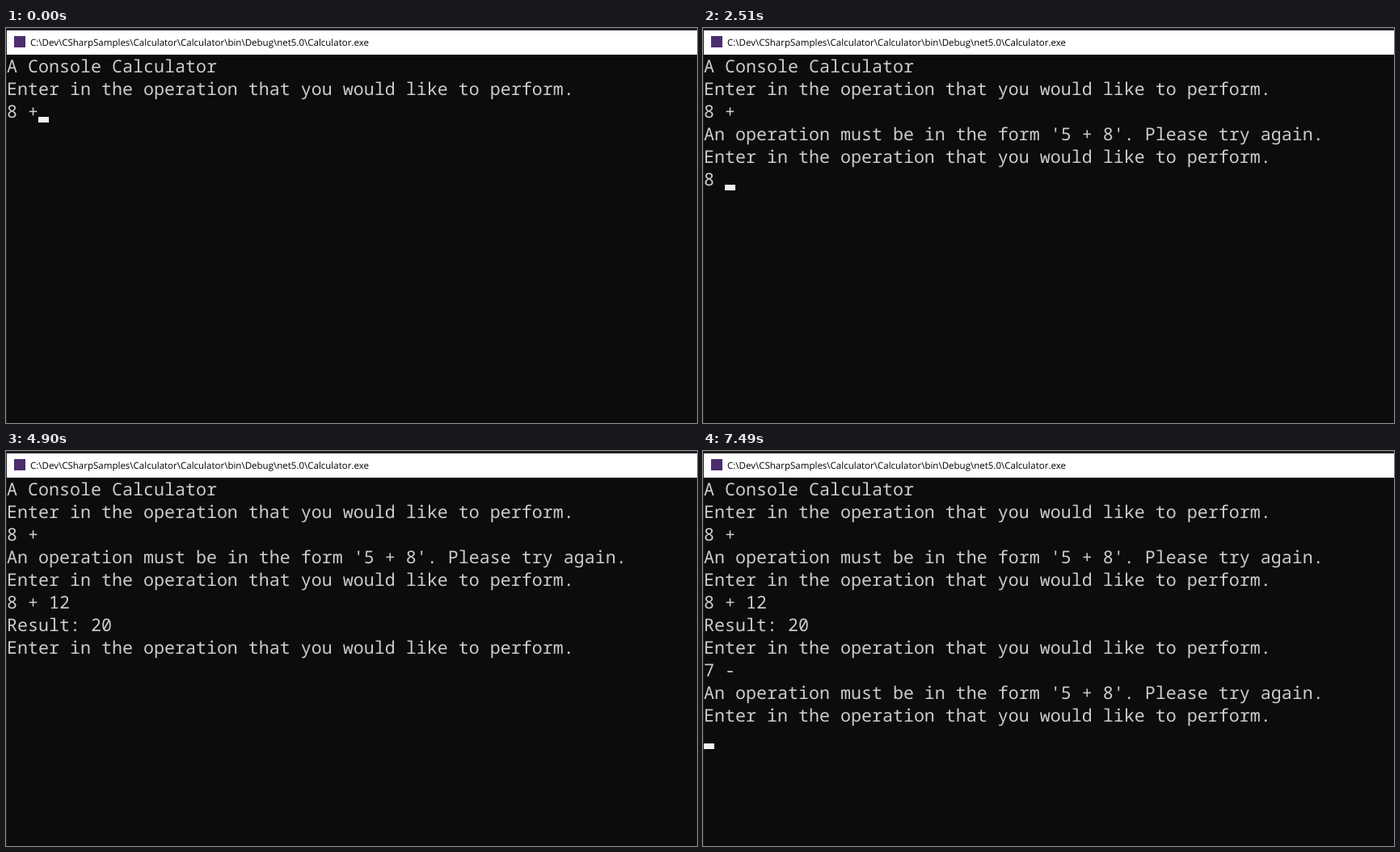
An HTML page for the animation above (8000 ms loop, 855 by 489 pixels).

```html
<!DOCTYPE html>
<html lang="en">
<head>
<meta charset="utf-8">
<title>Console calculator</title>
<style>
  html, body { margin: 0; height: 100%; overflow: hidden; background: #0c0c0c; }
  svg { display: block; text-rendering: geometricPrecision; }
  .title { font: 11.53px "Open Sans", sans-serif; fill: #000; }
  #lines { font: 21.667px "Noto Sans Mono", monospace; fill: #ccc; }
</style>
</head>
<body>
<svg width="855" height="489" viewBox="0 0 855 489">
  <rect width="855" height="489" fill="#211f22"/>
  <rect x="1" y="3" width="854" height="30" fill="#fff"/>
  <rect x="1" y="33" width="854" height="456" fill="#0c0c0c"/>
  <rect x="10" y="10" width="14" height="14" fill="#4b2d6e"/>
  <text class="title" x="30" y="22">C:\Dev\CSharpSamples\Calculator\Calculator\bin\Debug\net5.0\Calculator.exe</text>
  <g id="lines"></g>
  <rect id="cursor" width="13" height="7" fill="#f2f2f2"/>
</svg>
<script>
const DURATION = 8000, LEFT = 1, TOP = 33, CELL = 13, LINE = 28, BASELINE = 22, ROWS = 12;
const PROMPT = "Enter in the operation that you would like to perform.\n";
const ERROR = "\nAn operation must be in the form '5 + 8'. Please try again.\n" + PROMPT;

// [time in ms, text to append]; null hides the cursor until the next entry
const events = [
  [0, "A Console Calculator\n" + PROMPT + "8 +"], [130, null],
  [560, ERROR], [1270, null], [1800, ""],
  [2230, "8"], [2510, " "], [2760, null],
  [2910, "+"], [3160, " "], [3310, null],
  [3460, "1"], [3580, "2"], [3860, null],
  [4010, "\nResult: 20\n" + PROMPT], [4900, null], [5450, ""],
  [5910, "7"], [6200, " "], [6490, "-"], [6930, null],
  [7490, ERROR]
];

const cursor = document.getElementById("cursor");
const rows = Array.from({ length: ROWS }, (_, i) => {
  const row = document.createElementNS("http://www.w3.org/2000/svg", "text");
  row.setAttribute("x", LEFT);
  row.setAttribute("y", TOP + i * LINE + BASELINE);
  return document.getElementById("lines").appendChild(row);
});

let shown = -1;

function draw(time) {
  const past = events.filter(([start]) => start <= time);
  if (past.length === shown) return;
  shown = past.length;

  const lines = past.map(([, text]) => text ?? "").join("").split("\n");
  rows.forEach((row, i) => { row.textContent = lines[i] ?? ""; });
  cursor.setAttribute("x", LEFT + lines.at(-1).length * CELL);
  cursor.setAttribute("y", TOP + lines.length * LINE - 7);
  cursor.setAttribute("visibility", past.at(-1)[1] === null ? "hidden" : "visible");
}

const startTime = performance.now();
function frame() {
  draw((performance.now() - startTime) % DURATION);
  requestAnimationFrame(frame);
}
frame();
</script>
</body>
</html>
```
